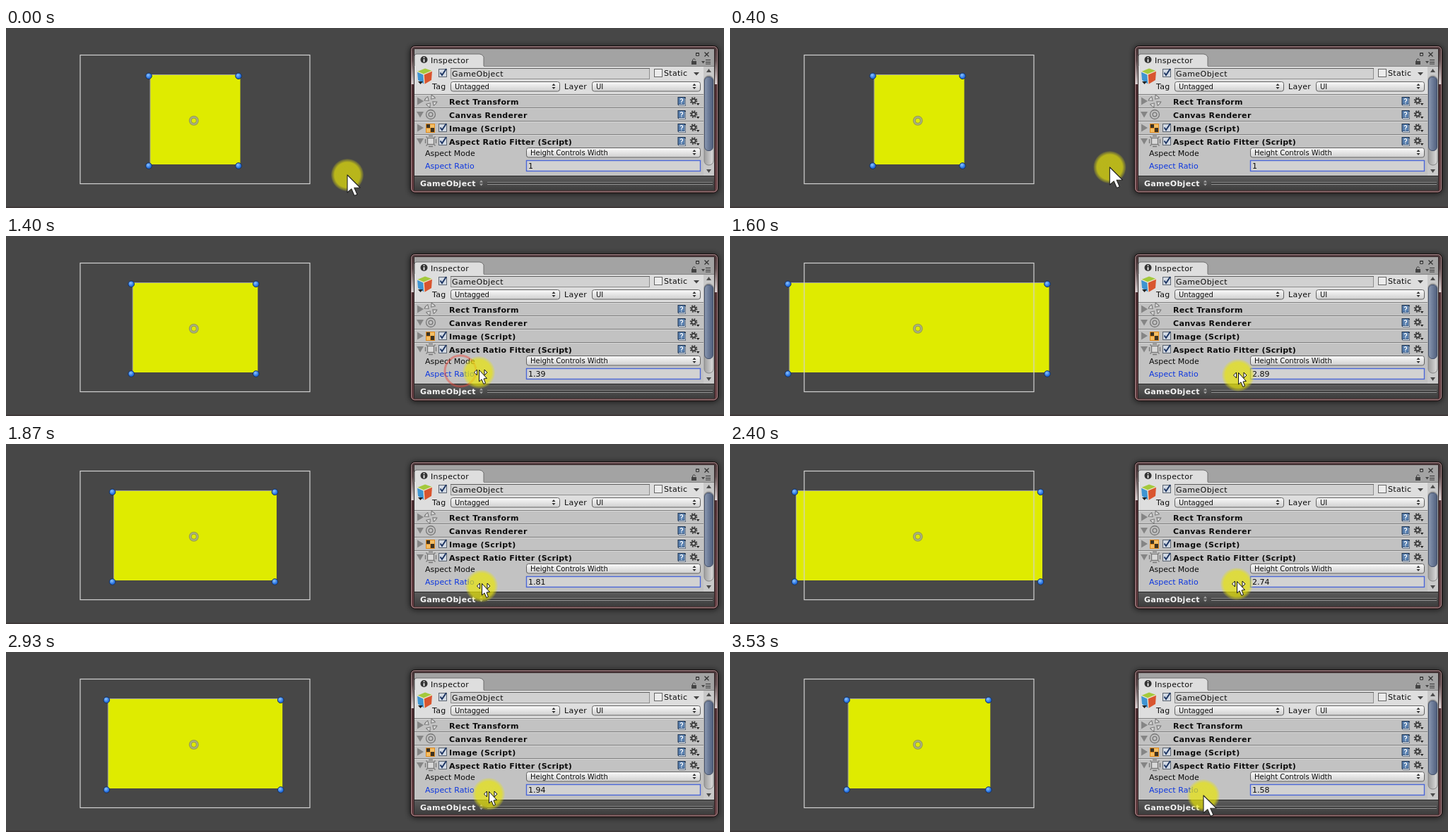
Recreate the animation shown at these times as an HTML page. Size 1016 by 256 pixels, loop 4.06 s.

```html
<!DOCTYPE html>
<html lang="en">
<head>
<meta charset="utf-8">
<title>Aspect ratio drag</title>
<style>
html, body { margin: 0; width: 100%; height: 100%; overflow: hidden; background: #474747; }
svg { display: block; width: 1016px; height: 256px; }
text { font: 11px "DejaVu Sans", sans-serif; fill: #0c0c0c; letter-spacing: .3px; white-space: pre; }
.bold { font-weight: bold; letter-spacing: .33px; }
.tight { letter-spacing: 0; }
.small { font-size: 10px; letter-spacing: 0; }
.focus { fill: #0b35e0; letter-spacing: .05px; }
</style>
</head>
<body>
<svg viewBox="0 0 1016 256" xmlns="http://www.w3.org/2000/svg">
  <defs>
    <linearGradient id="frame" x2="0" y2="1">
      <stop offset="0" stop-color="#4b3437"/><stop offset=".1" stop-color="#5d4a4c"/>
      <stop offset=".26" stop-color="#d8d0d1"/><stop offset=".26" stop-color="#4d2d31"/>
      <stop offset="1" stop-color="#653f43"/>
    </linearGradient>
    <linearGradient id="popupFill" x2="0" y2="1">
      <stop offset="0" stop-color="#fafafa"/><stop offset="1" stop-color="#cfcfcf"/>
    </linearGradient>
    <linearGradient id="bar" x2="0" y2="1">
      <stop offset="0" stop-color="#5d5d5d"/><stop offset="1" stop-color="#3d3d3d"/>
    </linearGradient>
    <linearGradient id="thumb">
      <stop offset="0" stop-color="#8e9bb2"/><stop offset=".35" stop-color="#74839f"/><stop offset="1" stop-color="#4f5e7c"/>
    </linearGradient>
    <linearGradient id="track">
      <stop offset="0" stop-color="#9d9d9d"/><stop offset="1" stop-color="#dedede"/>
    </linearGradient>
    <radialGradient id="knob" cx=".4" cy=".35">
      <stop offset="0" stop-color="#8cc4ff"/><stop offset="1" stop-color="#246fdf"/>
    </radialGradient>
    <radialGradient id="halo">
      <stop offset=".78" stop-color="#e9e508" stop-opacity=".7"/>
      <stop offset="1" stop-color="#e9e508" stop-opacity=".1"/>
    </radialGradient>
    <filter id="shadow" x="-5%" y="-10%" width="110%" height="120%">
      <feDropShadow dx="0" dy="1" stdDeviation="4" flood-color="#000" flood-opacity=".75"/>
    </filter>

    <g id="check">
      <rect x="-5.5" y="-5.5" width="11" height="11" fill="#d3dae4" stroke="#5b6470"/>
      <path d="M-3.500-.5L-1 3L5-6" fill="none" stroke="#1f3764" stroke-width="2"/>
    </g>
    <g id="closed"><path d="M-4-5.5L5 0L-4 5.5Z" fill="#858585"/></g>
    <g id="opened"><path d="M-5-4H5L0 4.5Z" fill="#858585"/></g>
    <g id="updown" fill="#333"><path d="M-2.500-1L0-4L2.500-1ZM-2.500 1H2.500L0 4Z"/></g>
    <g id="help">
      <path d="M-5.500-6H5L6-5V6.500H-4L-5.500 5Z" fill="#1d3350"/>
      <rect x="-4.500" y="-5" width="8.500" height="9.500" fill="#587fae"/>
      <path d="M-2-2Q-.5-4.500 1.500-2.500Q2-.5-.2 .5V1.500M-.2 2.600V3.800" fill="none" stroke="#fff" stroke-width="1.200"/>
      <path d="M-4 5.500H5V-4" fill="none" stroke="#dfe7f0"/>
    </g>
    <g id="gear">
      <circle r="4.300" fill="none" stroke="#383838" stroke-width="2" stroke-dasharray="1.800 1.577"/>
      <circle r="2.700" fill="none" stroke="#383838" stroke-width="1.700"/>
      <path d="M4 3.500H8.500L6.200 6.500Z" fill="#222"/>
    </g>
    <g id="dot"><circle r="4.300" fill="url(#knob)" stroke="#14305f"/></g>
    <path id="petal" d="M-1.500-2.500L-5.500-7Q-2-8.500 1.500-7.500Z" fill="#d9d9d9" stroke="#747474" transform="rotate(-45)"/>
  </defs>

  <rect width="1016" height="256" fill="#474747"/>
  <rect y="254" width="1016" height="2" fill="#3f3939"/>

  <g id="scene">
    <rect id="fill" y="66.500" height="127.500" fill="#dfeb00"/>
    <path id="edge" fill="none" stroke="#a5a79a"/>
    <rect x="105" y="38.500" width="325" height="183" fill="none" stroke="#d2d2d2" stroke-width="1.200"/>
    <circle cx="265.800" cy="131.800" r="5" fill="none" stroke="#979e4c" stroke-width="4"/>
    <circle cx="265.800" cy="131.800" r="5" fill="none" stroke="#a9b086" stroke-width="2"/>
    <g id="dots"></g>
  </g>

  <g id="panel">
    <rect x="572.500" y="25.500" width="435" height="208.500" rx="6" fill="url(#frame)" stroke="#170b0d" filter="url(#shadow)"/>
    <rect x="573.500" y="26.500" width="433" height="206.500" rx="5" fill="none" stroke="#c3a3a6" stroke-opacity=".8"/>
    <rect x="577" y="29.500" width="426" height="202" fill="#2c2425"/>
    <rect x="578" y="30" width="424" height="25" fill="#a3a3a3"/>
    <path d="M578 54.500V40Q578 37 581 37H670Q674 37 676 41V54.500Z" fill="#dedede" stroke="#6e6e6e"/>
    <rect x="578" y="54" width="424" height="41" fill="#dedede"/>
    <path d="M676 54.500H1002" stroke="#858585"/>
    <rect x="578" y="95" width="409" height="115" fill="#c2c2c2"/>

    <circle cx="591.500" cy="45" r="5" fill="#333"/>
    <path d="M591.500 41.500V43M591.500 44.200V48.500" stroke="#fff" stroke-width="1.700"/>
    <text x="601" y="50">Inspector</text>
    <g fill="none" stroke="#333">
      <path d="M976.500 35.500H980.500V39.500H976.500ZM976 36H981"/>
      <path d="M988.500 34.500L994.500 40.500M994.500 34.500L988.500 40.500" stroke-width="1.300"/>
      <path d="M971.500 47V45.500Q973.500 42 975.500 45.500"/>
      <path d="M990 45.500H997M990 48.500H997M990 51H997"/>
    </g>
    <path d="M970 47H977V52H970ZM984 47H989L986.500 50.500Z" fill="#444"/>

    <path d="M582 62L593 57.500L603 61L591 66Z" fill="#a4c93c"/>
    <path d="M582 62L591 66L592 80L583 74Z" fill="#3f94d2"/>
    <path d="M591 66L603 61L602 74L592 80Z" fill="#d9552f"/>
    <path d="M582 62L591 66L603 61M591 66L592 80" fill="none" stroke="#f0e6cf" stroke-width="1.300"/>
    <path d="M583 76H590L586.500 80Z" fill="#222"/>
    <use href="#check" x="618" y="64"/>
    <rect x="629.500" y="57.500" width="281" height="15" fill="#d1d1d1" stroke="#8e8e8e"/>
    <path d="M629 57.500H911" stroke="#5f5f5f"/>
    <text x="631" y="69" style="letter-spacing:.45px">GameObject</text>
    <rect x="917.500" y="58.500" width="11" height="11" fill="#ececec" stroke="#666"/>
    <text x="931" y="68">Static</text>
    <path d="M973 63H981L977 67.500Z" fill="#444"/>
    <text x="603" y="87">Tag</text>
    <text x="790" y="87">Layer</text>

    <g id="popups"></g>
    <g id="rows"></g>

    <g transform="translate(601 104)" id="petals"></g>
    <g fill="none" stroke="#777" stroke-width="1.300">
      <circle cx="601" cy="123" r="6.500"/><circle cx="601" cy="123" r="2.900"/>
      <rect x="596.500" y="156.500" width="9" height="9" fill="#d8d8d8"/>
      <path d="M598 153.500H604M598 168.500H604M593.500 158V164M608.500 158V164M594.500 154.500L596 156M607.500 154.500L606 156M594.500 167.500L596 166M607.500 167.500L606 166"/>
    </g>
    <rect x="594" y="136" width="13" height="13" fill="#e08a1e"/>
    <path d="M595 137H600V142H606V148H601V142H595Z" fill="#3d3323"/>
    <path d="M600 137H606V142H600ZM595 143H600V148H595Z" fill="#f3bd63"/>
    <use href="#check" x="618" y="142"/>
    <use href="#check" x="618" y="161"/>

    <text class="tight" x="593" y="182">Aspect Mode</text>
    <text class="focus" x="593" y="200">Aspect Ratio</text>
    <rect x="736.500" y="188.500" width="246" height="15" fill="#d2d2d2" stroke="#4a66d8" stroke-width="1.400"/>
    <text class="tight" id="value" x="739" y="200"></text>

    <rect x="987" y="55" width="15" height="155" fill="#c9c9c9"/>
    <rect x="988" y="68" width="13" height="127" rx="6" fill="url(#track)" stroke="#858585"/>
    <rect x="988.500" y="69.500" width="12" height="105" rx="5.500" fill="url(#thumb)" stroke="#435069"/>
    <path d="M991 63H998L994.500 58ZM991 201H998L994.500 206Z" fill="#4c4c4c"/>

    <rect x="578" y="210" width="424" height="21" fill="url(#bar)"/>
    <path d="M578 210.500H1002" stroke="#262626"/>
    <text class="bold" x="586" y="225" style="fill:#f4f4f4">GameObject</text>
    <use href="#updown" x="672.500" y="220.500" style="filter:invert(.75)"/>
    <path d="M681 219.500H1000M681 222.500H1000" stroke="#8b8b8b"/>
    <path d="M681 220.500H1000" stroke="#2d2d2d"/>
  </g>

  <circle id="ring" cx="643" cy="192" fill="none" stroke="#e8473c" stroke-width="3"/>
  <g id="pointer">
    <circle r="23" fill="url(#halo)"/>
    <g id="arrow"><path d="M0 0V25L5.800 19.800L10 29.500L14 27.800L9.800 18.300L18 18Z" fill="#fff" stroke="#222" stroke-width="1.100" stroke-linejoin="round"/></g>
    <g id="resize">
      <path d="M-6.500 0L-2.500-4V4ZM12 0L8-4V4Z" fill="#fff" stroke="#111"/>
      <path d="M.5-3.500V13L4 9.800L6.800 16.500L9.500 15.300L7 9L11.500 8.500Z" fill="#fff" stroke="#111" stroke-linejoin="round"/>
    </g>
  </g>
</svg>

<script>
const $ = id => document.getElementById(id);
const set = (id, attrs) => {
  for (const name in attrs) $(id).setAttribute(name, attrs[name]);
};

const popup = (x, y, w, label) => `
  <rect x="${x + .5}" y="${y + .5}" width="${w}" height="13.500" rx="3" fill="url(#popupFill)" stroke="#626262"/>
  <text class="small" x="${x + 6}" y="${y + 11}">${label}</text>
  <use href="#updown" x="${x + w - 8}" y="${y + 7}"/>`;

const row = (y, label, mark, spacing) => `
  <path d="M578 ${y - 9.5}H987" stroke="#7d7d7d"/>
  <path d="M578 ${y - 8.5}H987" stroke="#dadada"/>
  <use href="#${mark}" x="586" y="${y}"/>
  <text class="bold" x="627" y="${y + 5}" style="letter-spacing:${spacing}px">${label}</text>
  <use href="#help" x="956" y="${y}"/>
  <use href="#gear" x="973" y="${y - .5}"/>`;

$("popups").innerHTML =
  popup(629, 76, 154, "Untagged") +
  popup(829, 76, 153, "UI") +
  popup(736, 170, 246, "Height Controls Width");
$("rows").innerHTML =
  row(104, "Rect Transform", "closed", .33) +
  row(123, "Canvas Renderer", "opened", .33) +
  row(142, "Image (Script)", "closed", .4) +
  row(161, "Aspect Ratio Fitter (Script)", "opened", .23);
$("petals").innerHTML = [0, 90, 180, 270].map(a =>
  `<use href="#petal" transform="rotate(${a})"/>`).join("");

// step, pointer x, pointer y, ratio
const path = [
  [3, 483, 209, 1], [4, 488, 208, 1], [7, 562, 193, 1], [9, 632, 184, 1],
  [10, 641, 183, 1], [11, 643, 186, 1], [13, 643, 194, 1], [15, 643, 194, 1],
  [17, 645, 194, 1.03], [19, 653, 194, 1.12], [21, 669, 194, 1.39],
  [23, 704, 197, 2.43], [24, 719, 198, 2.89], [25, 716, 199, 2.78],
  [28, 673, 202, 1.81], [30, 657, 201, 1.43], [32, 657, 201, 1.43],
  [34, 672, 200, 1.7], [36, 717, 199, 2.74], [38, 742, 201, 3.6],
  [39, 752, 201, 4.07], [40, 747, 202, 4.01], [41, 738, 202, 3.8],
  [43, 696, 202, 2.3], [45, 670, 202, 1.58], [52, 670, 202, 1.58],
  [53, 670, 204, 1.58]
];
const LOOP = 4060, STEP = 200 / 3, CENTER = 265.5, UNIT = 63.5;

function poseAt(step) {
  const next = path.findIndex(p => p[0] >= step);
  if (next === 0) return path[0].slice(1);
  if (next < 0) return path[path.length - 1].slice(1);
  const a = path[next - 1], b = path[next];
  const u = (step - a[0]) / (b[0] - a[0]);
  return [1, 2, 3].map(i => a[i] + (b[i] - a[i]) * u);
}

function draw(step) {
  const [x, y, ratio] = poseAt(step);
  const half = UNIT * ratio;
  const left = CENTER - half, right = CENTER + half;

  set("fill", { x: left + 2, width: right - left + .5 });
  set("edge", { d: `M${left + 2} 194V66.500H${right + 2.5}` });
  $("dots").innerHTML = [left, right].map(dx =>
    [68.3, 196].map(dy => `<use href="#dot" x="${dx}" y="${dy}"/>`).join("")).join("");
  $("value").textContent = String(+ratio.toFixed(2));

  const sizing = step >= 12 && step < 53 && x < 734;
  set("pointer", { transform: `translate(${x} ${y})` });
  set("arrow", { visibility: sizing ? "hidden" : "visible" });
  set("resize", { visibility: sizing ? "visible" : "hidden" });

  const age = step - 15;
  const pressed = age > 0 && age < 8;
  set("ring", { r: pressed ? 22 * age / 6 : 0, opacity: pressed ? .9 - .07 * age : 0 });
}

const start = performance.now();
let shown = -1;
function tick() {
  const t = (performance.now() - start) % LOOP;
  const step = Math.floor((t + 4) / STEP);
  if (step !== shown) draw(shown = step);
  requestAnimationFrame(tick);
}
tick();
</script>
</body>
</html>
```
